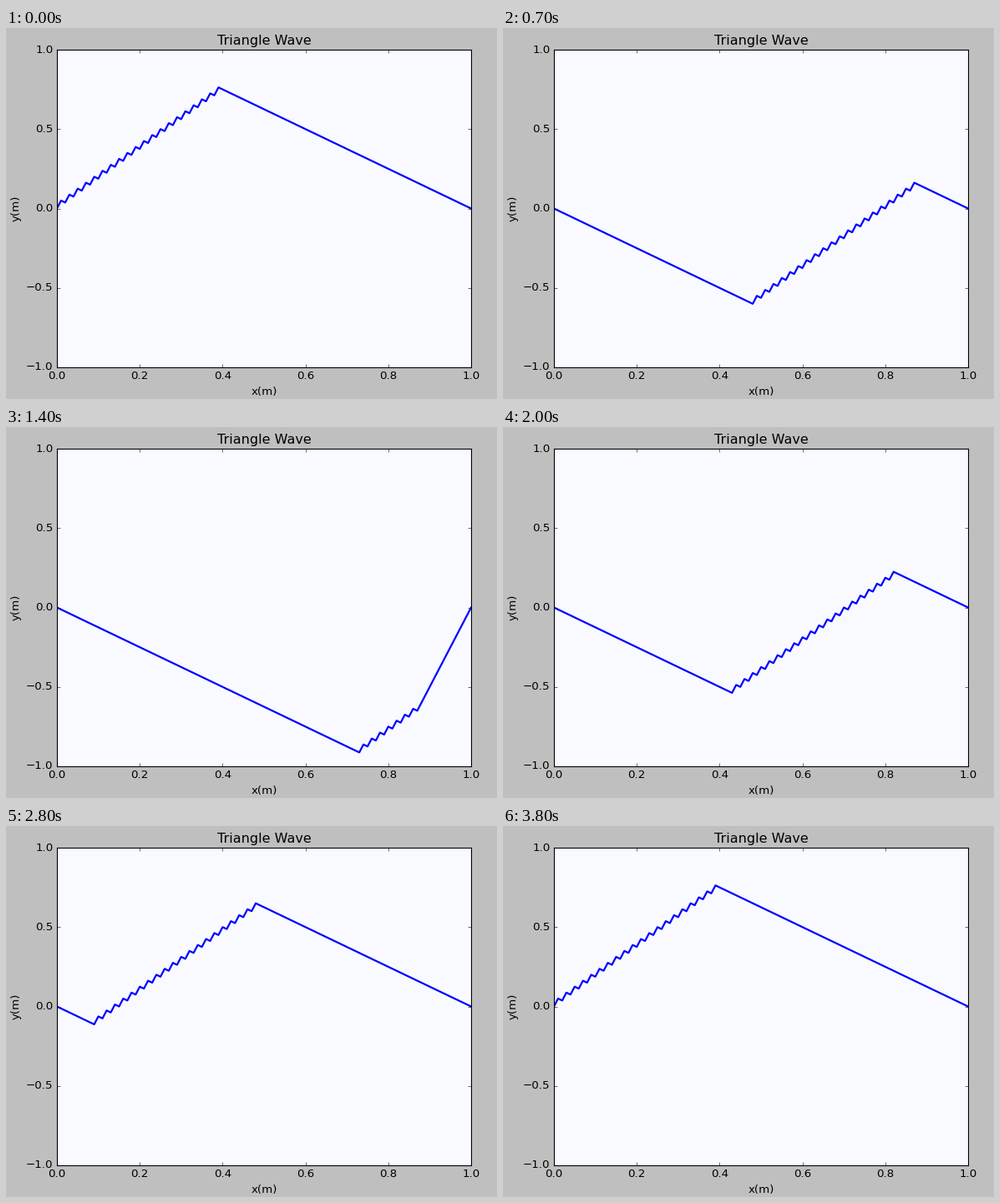
These frames come from a looping animation (588x445 px, 3.9 s). A matplotlib script:

```python
import math

import numpy as np
import matplotlib.pyplot as plt
from matplotlib.animation import FuncAnimation

W, H, DPI = 588, 445, 80
FRAMES, INTERVAL = 39, 100
CELLS, PERIOD = 100, 200
START_STEP = 20

plt.rcParams.update({
    "font.family": "DejaVu Sans",
    "font.size": 12,
    "axes.titlesize": 14.4,
    "axes.labelsize": 12,
    "axes.labelpad": 5,
    "axes.linewidth": 1.0,
    "ytick.alignment": "center",
})


def simulate():
    """Leapfrog wave equation for a plucked string, fixed at both ends."""
    x = np.linspace(0, 1, CELLS + 1)
    pluck = np.minimum(5 * x, 1.25 * (1 - x))
    # The first two steps are equal, which leaves the sawtooth between the kinks.
    rows = [pluck, pluck.copy()]
    while len(rows) <= PERIOD + START_STEP:
        now, before = rows[-1], rows[-2]
        after = np.zeros_like(now)
        after[1:-1] = now[2:] + now[:-2] - before[1:-1]
        rows.append(after)
    return x, rows


def step_at(frame):
    """Simulation step shown in a frame; the playback gradually slows down."""
    if frame == FRAMES - 1:
        return START_STEP
    return math.floor(START_STEP + 0.47 + 237 * math.log(1 + frame / 31))


x, rows = simulate()

fig = plt.figure(figsize=(W / DPI, H / DPI), dpi=DPI, facecolor="0.75")
# Whole-pixel edges let the frame lines snap cleanly.
ax = fig.add_axes([61 / W, 38 / H, 496 / W, 381 / H], facecolor="#f8faff")
ax.set_xlim(0, 1)
ax.set_ylim(-1, 1)
ax.set_xticks(np.linspace(0, 1, 6))
ax.set_yticks(np.linspace(-1, 1, 5))
ax.tick_params(direction="in", length=4, width=0.5, pad=4, top=True, right=True)
ax.set_title("Triangle Wave", pad=5, y=1.0)
ax.set_xlabel("x(m)")
ax.set_ylabel("y(m)")
string, = ax.plot(x, rows[START_STEP], color="blue", lw=2)


def update(frame):
    string.set_ydata(rows[step_at(frame)])
    return string,


anim = FuncAnimation(fig, update, frames=FRAMES, interval=INTERVAL,
                     repeat=True, repeat_delay=0)
plt.show()
```
